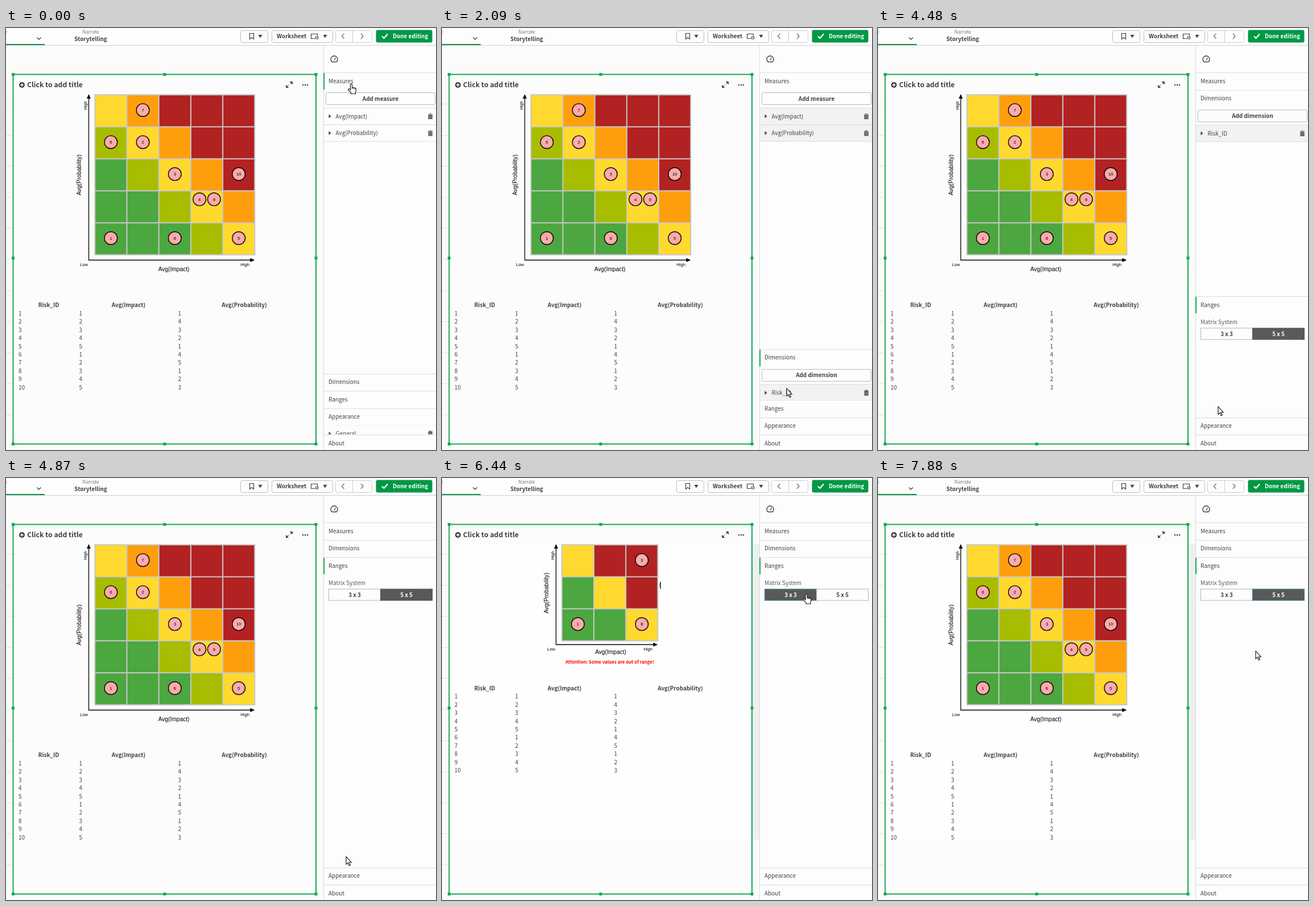
An HTML page with a canvas for the animation above (8 s loop, 756 by 741 pixels).

```html
<!DOCTYPE html>
<html lang="en">
<head>
<meta charset="utf-8">
<title>Risk matrix settings</title>
<style>
html, body { margin: 0; width: 100%; height: 100%; overflow: hidden; background: #fbfbfb; }
canvas { display: block; }
</style>
</head>
<body>
<canvas id="stage" width="756" height="741"></canvas>
<script>
const ctx = document.getElementById('stage').getContext('2d');
const LOOP = 8000, STEP = 131.15;
const UI = '"Noto Sans CJK JP", "Noto Sans CJK SC", "Noto Sans CJK", "Open Sans", sans-serif';
const ARIAL = '"Liberation Sans", sans-serif';
const GREEN = '#14a951', INK = '#404040', LINE = '#dedede';

const IMPACT = [1, 2, 3, 4, 5, 1, 2, 3, 4, 5];
const PROBABILITY = [1, 4, 3, 2, 1, 4, 5, 1, 2, 3];

// ---------- drawing helpers ----------
function rect(x, y, w, h, color) {
  ctx.fillStyle = color;
  ctx.fillRect(x, y, w, h);
}

function text(s, x, y, { size = 9.95, bold = false, color = INK, align = 'left', family = UI } = {}) {
  ctx.font = `${bold ? 'bold ' : ''}${size}px ${family}`;
  ctx.fillStyle = color;
  ctx.textAlign = align;
  ctx.fillText(s, x, Math.round(y + size * 0.36));
}

const boldText = (s, x, y, options) => text(s, x, y, { size: 9.9, bold: true, ...options });

function shape(d, { fill, stroke, width = 1, x = 0, y = 0 }) {
  const path = new Path2D(d);
  ctx.save();
  ctx.translate(x, y);
  ctx.lineWidth = width;
  if (fill) { ctx.fillStyle = fill; ctx.fill(path); }
  if (stroke) { ctx.strokeStyle = stroke; ctx.stroke(path); }
  ctx.restore();
}

function box(x, y, w, h, fill, stroke, radius = 3) {
  ctx.beginPath();
  ctx.roundRect(x + 0.5, y + 0.5, w - 1, h - 1, radius);
  ctx.fillStyle = fill;
  ctx.fill();
  if (stroke) { ctx.strokeStyle = stroke; ctx.lineWidth = 1; ctx.stroke(); }
}

function disc(x, y, r, fill, stroke, width) {
  ctx.beginPath();
  ctx.arc(x, y, r, 0, 7);
  ctx.fillStyle = fill;
  ctx.fill();
  if (stroke) { ctx.strokeStyle = stroke; ctx.lineWidth = width; ctx.stroke(); }
}

function clipped(x, y, w, h, draw) {
  ctx.save();
  ctx.beginPath();
  ctx.rect(x, y, w, h);
  ctx.clip();
  draw();
  ctx.restore();
}

function upright(s, x, y, size) {
  ctx.save();
  ctx.translate(x, y);
  ctx.rotate(-Math.PI / 2);
  text(s, 0, 0, { size, family: ARIAL, align: 'center', color: '#000' });
  ctx.restore();
}

// ---------- top bar ----------
function drawToolbar() {
  rect(0, 0, 756, 30, '#fdfdfd');
  rect(0, 30, 756, 1, '#cfcfcf');
  rect(0, 28, 68, 2, '#10964a');
  text('e', 2, 7, { size: 8.4, color: '#777', align: 'right' });
  shape('M54.5 16.5l3.5 3.5 3.5-3.5', { stroke: INK, width: 1.3 });
  text('Narrate', 149, 7, { size: 8.4, color: '#777', align: 'center' });
  boldText('Storytelling', 149, 19.5, { align: 'center' });

  box(412, 4, 49, 22, '#fdfdfd', '#bdbdbd');
  shape('M428.5 9.5h7v10l-3.5-3-3.5 3z', { stroke: INK, width: 1.2 });
  box(467, 4, 108, 22, '#fdfdfd', '#bdbdbd');
  boldText('Worksheet', 476, 14.5);
  shape('M543 18.5h-6.5v-8h11v4M544.5 15.5h4v3.500h-4z', { stroke: INK, width: 1.2 });
  for (const x of [447, 561]) shape('M-3.500 -2.500h7l-3.500 5.500z', { fill: INK, x, y: 14.5 });
  box(579, 4, 65, 22, '#fdfdfd', '#cdcdcd');
  rect(609, 4, 1, 22, '#cdcdcd');
  shape('M594.5 10l-4 4.500 4 4.500M624 10l4 4.500-4 4.500', { stroke: '#707070', width: 1.3 });
  box(650, 3, 100, 23, '#009845');
  shape('M661 14.500l3.500 3.500 6.500-7.500', { stroke: '#fff', width: 2.2 });
  boldText('Done editing', 680, 14.5, { color: '#fff' });
}

// ---------- chart object ----------
function drawSelection(refreshed) {
  rect(0, 31, 558, 710, '#fbfbfb');
  for (let i = 0; i < 11; i++) rect(0, Math.round(133 + i * 54.6), 548, 1, '#e2e2e2');
  if (refreshed) rect(546, 116, 12, 519, '#efefef');
  rect(13, 82, 532, 648, '#fcfcfc');
  if (refreshed) rect(21, 116, 524, 519, '#fefefe');
  ctx.strokeStyle = GREEN;
  ctx.lineWidth = 2;
  ctx.strokeRect(12.5, 81.5, 532.5, 649);
  for (const x of [12.5, 279, 545])
    for (const y of [81.5, 404, 730.5])
      if (x !== 279 || y !== 404) rect(x - 2.5, y - 2.5, 5, 5, GREEN);

  disc(28, 100, 5, INK);
  shape('M25 100h6M28 97v6', { stroke: '#fff', width: 1.5 });
  text('Click to add title', 37, 99.5, { size: 12.2, bold: true });
  shape('M499.500 94.500h4v4zM492.500 100.500v4h4zM503 95l-4 4M493 104l4-4', { stroke: INK, fill: INK });
  for (const x of [522, 526, 530]) disc(x, 100, 1.3, INK);
}

function cellColor(diagonal, n) {
  if (diagonal === 0) return '#ffd92f';
  if (n === 5 && diagonal === 1) return '#ff9e0d';
  if (n === 5 && diagonal === -1) return '#a8bc00';
  return diagonal > 0 ? '#b22222' : '#4ca740';
}

function drawMatrix(n) {
  const pitch = 56.2, left = n === 5 ? 156.3 : 210.8, top = 117.3;
  const side = n * pitch, right = left + side;
  const axisX = Math.round(left - 10.8) + 0.5 - (n === 5 ? 1 : 0);
  const axisY = n === 5 ? 407.5 : 292.5;
  const middleX = n === 5 ? 295 : 296.5;

  rect(left - 1, top - 1, side + 2, side + 2, '#c8c8c8');
  for (let r = 0; r < n; r++)
    for (let c = 0; c < n; c++)
      rect(left + c * pitch + 1, top + r * pitch + 1, pitch - 2, pitch - 2, cellColor(c - r, n));

  shape(`M${axisX} 120V${axisY}H${right - 4}`, { stroke: '#000', width: 1.3 });
  shape('M0 0l3.500 8h-7z', { fill: '#000', x: axisX, y: 116 });
  shape('M0 0l-8 3.500v-7z', { fill: '#000', x: right, y: axisY });

  const small = { size: 7.65, family: ARIAL, color: '#000' };
  text('Low', axisX - 15.5, axisY + 7.8, small);
  text('High', right - 9.3, axisY + 7.8, { ...small, align: 'right' });
  text('Avg(Impact)', middleX, axisY + (n === 5 ? 15.5 : 13), { size: 10.2, family: ARIAL, color: '#000', align: 'center' });
  upright('High', axisX - 6.5, 136, 7.65);
  upright('Avg(Probability)', axisX - 18, n === 5 ? 258 : 202, 10.2);

  clipped(0, 116, right + 5.6, 400, () => IMPACT.forEach((impact, i) => {
    const sameCell = j => IMPACT[j] === impact && PROBABILITY[j] === PROBABILITY[i];
    const twin = IMPACT.findIndex((_, j) => j !== i && sameCell(j));
    const x = left + (impact - 0.5) * pitch + (twin < 0 ? 0 : twin > i ? -12.8 : 12.8);
    const y = top - 1.2 + (n - PROBABILITY[i] + 0.5) * pitch - (twin < 0 ? 0 : 12);
    disc(x, y, 11.3, '#ffaaaa', '#000', 1.4);
    text(String(i + 1), x, y, { ...small, align: 'center' });
  }));

  if (n === 3)
    text('Attention: Some values are out of range!', 295, 323, { size: 7.9, bold: true, color: '#f00', align: 'center' });
}

function drawTable(y) {
  boldText('Risk_ID', 75, y, { align: 'center' });
  boldText('Avg(Impact)', 215.5, y, { align: 'center' });
  boldText('Avg(Probability)', 419, y, { align: 'center' });
  IMPACT.forEach((impact, i) => {
    const rowY = y + 14.7 + i * 14.44;
    text(String(i + 1), 22, rowY);
    text(String(impact), 128.5, rowY);
    text(String(PROBABILITY[i]), 302.5, rowY);
  });
}

// ---------- property panel ----------
function addButton(label, y) {
  box(562, y - 11, 193, 22, '#fdfdfd', '#b8b8b8', 2);
  boldText(label, 658.5, y, { align: 'center' });
}

function listItem(label, y, shaded) {
  rect(559, y - 15, 197, 30, shaded ? '#f2f2f2' : '#fdfdfd');
  rect(559, y - 15, 197, 1, LINE);
  rect(559, y + 14, 197, 1, LINE);
  shape('M567.500 -3.500l4 3.500-4 3.500z', { fill: INK, y });
  text(label, 579.5, y);
  shape('M742 -3h8M744.500 -4.500h3M743 -1.500h6v6h-6z', { stroke: '#5b4a42', fill: '#8a7468', width: 1.2, y });
}

function switchButton(label, x, w, y, dark, focused) {
  rect(x, y - 10.5, w, 21, focused ? '#3f7f9c' : dark ? '#555' : '#b3b3b3');
  rect(x + 1, y - 9.5, w - 2, 19, dark ? '#595959' : '#fdfdfd');
  boldText(label, x + w / 2, y, { align: 'center', color: dark ? '#fff' : INK });
}

const SECTIONS = [
  ['Measures', (y, t) => {
    addButton('Add measure', y + 31);
    listItem('Avg(Impact)', y + 62, t > 100);
    listItem('Avg(Probability)', y + 91.5, t > 100);
  }],
  ['Dimensions', y => {
    addButton('Add dimension', y + 31);
    listItem('Risk_ID', y + 61.5, true);
  }],
  ['Ranges', (y, t) => {
    const three = t > 5850 && t < 7450;
    const five = t < 6260 || t > 6520;
    text('Matrix System', 567, y + 30, { color: '#595959' });
    switchButton('3 x 3', 567, 92, y + 51, three, t > 6100 && t < 7150);
    switchButton('5 x 5', 658, 92, y + 51, five, t > 7150);
  }],
  ['Appearance', y => listItem('General', y + 29.5, false)],
  ['About', () => {}]
];

const swing = (t, start, duration) =>
  0.5 - 0.5 * Math.cos(Math.PI * Math.min(1, Math.max(0, (t - start) / duration)));

function drawPanel(t) {
  rect(558, 31, 198, 710, '#fdfdfd');
  disc(577, 55, 6, '#fdfdfd');
  shape('M573 59.500a6 6 0 1 1 8 0zM577 56.500l2.500-4', { stroke: INK, width: 1.4 });

  const toMeasures = swing(t, -435, 490);
  const toDimensions = swing(t, 1980, 540);
  const toRanges = swing(t, 4240, 540);
  const openness = [toMeasures - toDimensions, toDimensions - toRanges, toRanges, 1 - toMeasures, 0];
  const active = t < 2050 ? 0 : t < 4300 ? 1 : 2;

  let y = 93;
  SECTIONS.forEach(([name, drawContent], i) => {
    const height = 514 * openness[i];
    rect(559, Math.round(y - 15), 197, 1, LINE);
    text(name, 567, y);
    if (i === active) rect(558, y - 14, 2, 29, GREEN);
    if (height > 0.5) clipped(559, y + 15, 197, height, () => drawContent(y, t));
    y += 30.5 + height;
  });
  rect(558, 31, 1, 710, '#dadada');
  if (openness[active] > 0) rect(558, 79 + 30.5 * active + 514 * openness.slice(0, active).reduce((a, b) => a + b, 0), 2, 29, GREEN);
}

// ---------- pointer: time, x, y, hand ----------
const POINTER = [
  [0, 607, 98, 1], [125, 607, 130, 0], [905, 608, 629, 1], [1040, 608, 631, 1], [1800, 608, 631, 1],
  [1830, 607, 627, 1], [2050, 606, 633, 0], [2120, 606, 633, 0], [2700, 606, 623, 0], [3060, 606, 623, 0],
  [3150, 606, 625, 0], [3410, 605, 638, 0], [3540, 603, 645, 0], [3800, 598, 665, 1], [4340, 598, 665, 1],
  [4400, 598, 665, 0], [4980, 598, 665, 0], [5110, 598, 641, 0], [5640, 619, 224, 0], [5880, 610, 204, 1],
  [6280, 610, 204, 1], [6550, 664, 203, 1], [7200, 697, 203, 1], [7400, 697, 203, 1], [7500, 692, 220, 0],
  [7860, 664, 304, 0], [8000, 664, 304, 0]
];
const ARROW = 'M0 0V13.500L3 10.700L5.200 15.500L7.300 14.600L5.200 10H9.200Z';
const HAND = 'M-1.500 1Q0 -.7 1.500 1V6L6.500 7.200Q8.800 8 8.500 10.500L7.500 14.500V17.500H-.5V15.500L-5.500 10.500Q-5.300 8 -3 9L-1.500 10.500Z';

function drawPointer(t) {
  const i = POINTER.findIndex((key, k) => k === POINTER.length - 1 || t < POINTER[k + 1][0]);
  const [t0, x0, y0, hand] = POINTER[i];
  const [t1, x1, y1] = POINTER[Math.min(i + 1, POINTER.length - 1)];
  const p = t1 > t0 ? swing(t, t0, t1 - t0) : 0;
  shape(hand ? HAND : ARROW, {
    fill: '#fff', stroke: '#111', width: 1.1,
    x: x0 + (x1 - x0) * p, y: y0 + (y1 - y0) * p
  });
  if (hand) shape('M1.500 6v3M4 6.700v2.500M6.300 7.400v2', { stroke: '#111', x: x0 + (x1 - x0) * p, y: y0 + (y1 - y0) * p });
}

function render(now) {
  const t = Math.floor((now % LOOP) / STEP + 0.1) * STEP;
  const size = t > 6260 && t < 7450 ? 3 : 5;
  drawSelection(t > 6260);
  drawMatrix(size);
  drawTable(size === 5 ? 486.5 : 369);
  drawToolbar();
  drawPanel(t);
  drawPointer(t);
}

const begin = performance.now();
function tick() {
  render(performance.now() - begin);
  requestAnimationFrame(tick);
}
tick();
</script>
</body>
</html>
```
